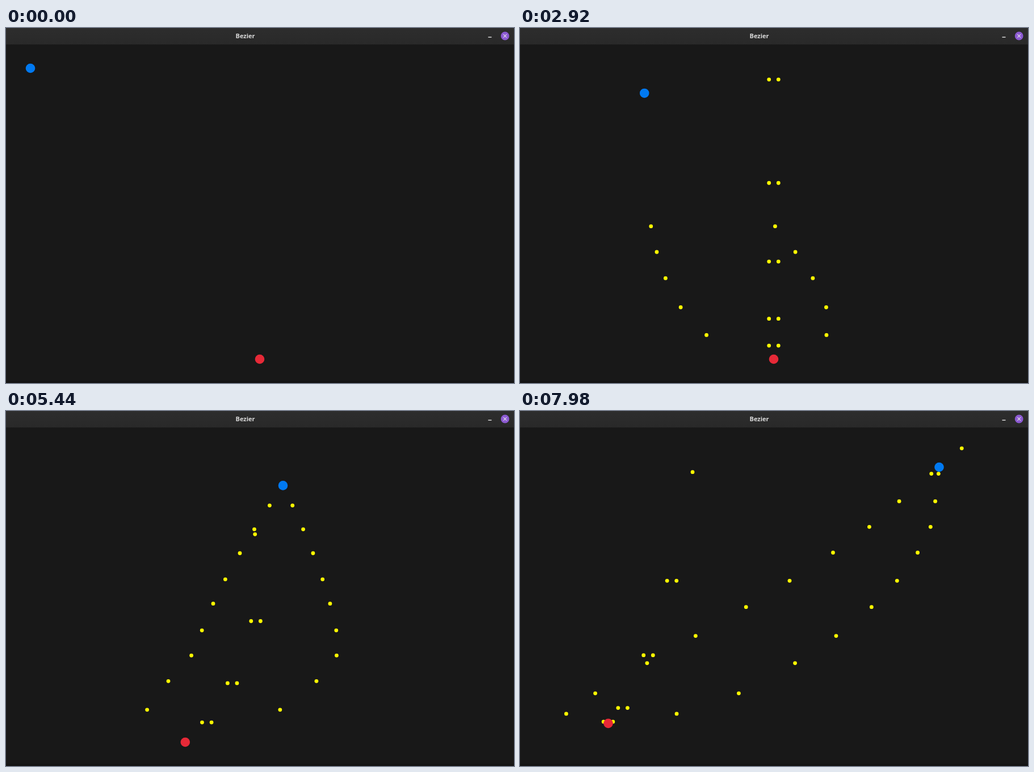
These frames come from a looping animation (895x626 px, 8000 ms). An HTML page with a canvas:

```html
<!DOCTYPE html>
<html lang="en">
<head>
<meta charset="utf-8">
<title>Bezier</title>
<style>
  html, body { margin: 0; width: 100%; height: 100%; overflow: hidden; background: #181818; }
  canvas { position: absolute; left: 0; top: 0; }
  header {
    position: absolute; left: 0; top: 0; width: 895px; height: 28.5px;
    background: linear-gradient(#2d2d2d, #292929);
    font: 700 11px/28px "Noto Sans", "Open Sans", sans-serif; color: #dadada;
  }
  header span { position: absolute; left: 321.5px; width: 200px; text-align: center; }
  header svg { position: absolute; left: 845px; top: 0; }
</style>
</head>
<body>
<canvas id="stage" width="895" height="626"></canvas>
<header>
  <span>Bezier</span>
  <svg width="50" height="28" fill="none" stroke="#e6e6e6">
    <path d="M4.5 16.2h6" stroke-width="1.4"/>
    <circle cx="34.2" cy="14" r="7.4" fill="#8c5ad2" stroke="none"/>
    <path d="M31.4 11.2l5.6 5.6m0-5.6l-5.6 5.6" stroke-width="1.1"/>
  </svg>
</header>
<script>
const ctx = document.getElementById('stage').getContext('2d');
const LOOP = 8000, START = 340, STEP = 46; // ms
const LAST = 166; // game steps in one loop
const TOP = 28;
const YELLOW = '#fdf900', BLUE = '#0079f1', RED = '#e62937';

const mix = (a, b, s) => ({ x: a.x + (b.x - a.x) * s, y: a.y + (b.y - a.y) * s });

function bezier(points, s) {
  while (points.length > 1) {
    points = points.slice(1).map((p, i) => mix(points[i], p, s));
  }
  return points[0];
}

const route = [
  { x: 43, y: 71 }, { x: 102.2, y: 90.4 }, { x: 335.4, y: 171.2 },
  { x: 596.2, y: 129.5 }, { x: 738.5, y: 99 }
];
const enemy = step => bezier(route, step / LAST);

// Waits, runs left, then turns upwards
function player(step) {
  const way = 3.453 * Math.max(0, step - 72), turn = 291.5;
  return { x: 447 - Math.min(way, turn), y: 584 - Math.max(0, way - turn) };
}

// Step at which shot i is fired: every 12 or 13 steps
const fired = i => Math.trunc(12.45 * i - .24);

// side is -1 or 1
function bullet(i, side, step) {
  const p = player(fired(i)), age = step - fired(i);
  return { x: p.x + side * 8.3, y: p.y - 16.5 - .152 * age * age };
}

// Quadratic curve from the player, out to one side, then onto the enemy
function missile(i, side, step) {
  const p = player(fired(i)), goal = enemy(step), age = step - fired(i);
  const from = { x: p.x, y: p.y - 6 };
  const bend = { x: p.x + side * 261.5 - .057 * (goal.x - p.x), y: from.y };
  const progress = .0077 * age + .079 - .0635 * Math.exp(-.0235 * age);
  return bezier([from, bend, goal], Math.sqrt(progress));
}

function dot({ x, y }, r, color) {
  ctx.fillStyle = color;
  ctx.beginPath();
  ctx.arc(x, y, r, 0, Math.PI * 2);
  ctx.fill();
}

function drawShots(place, step) {
  for (let i = 0; fired(i) < step; i++) {
    for (const side of [-1, 1]) {
      // An even pair leaving at the top takes the next pair's right half along.
      if (side > 0 && i % 2 && place(i - 1, side, step).y < TOP) continue;
      const p = place(i, side, step);
      if (p.y > TOP) dot(p, 3.4, YELLOW);
    }
  }
}

function draw(step) {
  ctx.fillStyle = '#181818';
  ctx.fillRect(0, 0, 895, 626);
  ctx.fillStyle = '#141414';
  ctx.fillRect(0, 622, 895, 4);
  dot(enemy(step), 8.3, BLUE);
  drawShots(bullet, step);
  drawShots(missile, step);
  dot(player(step), 8.3, RED);
}

function tick(now) {
  draw(Math.max(0, Math.floor((now % LOOP - START) / STEP)));
  requestAnimationFrame(tick);
}
tick(performance.now());
</script>
</body>
</html>
```
